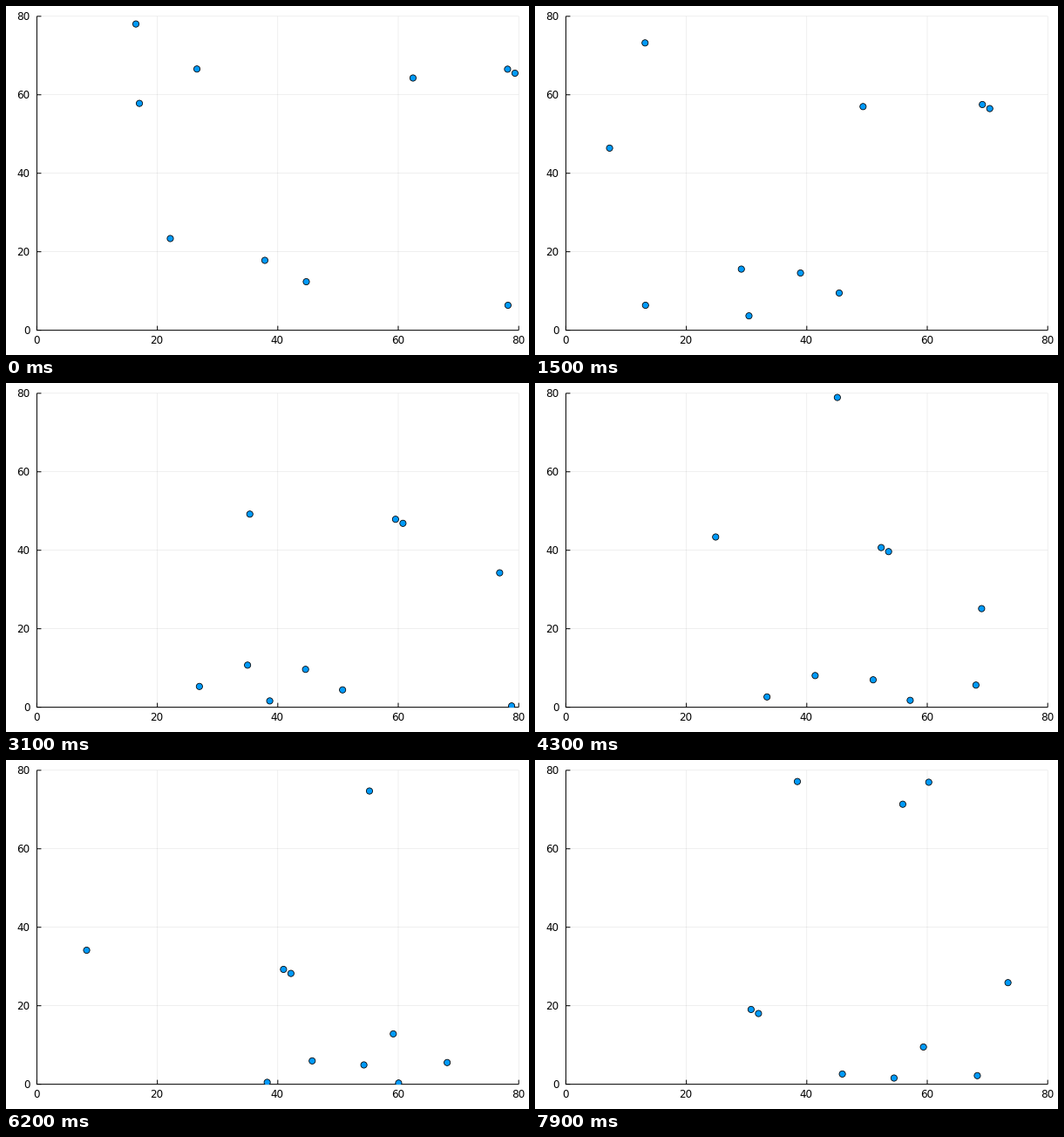
A matplotlib script that plays this animation: 600x400 px, repeating every 8000 ms.

```python
import numpy as np
import matplotlib.pyplot as plt
from matplotlib.animation import FuncAnimation
from matplotlib.patches import Circle, Rectangle

W, H, DPI = 600, 400, 100
LEFT, RIGHT, TOP, BOTTOM = 35.43, 588.19, 11.81, 371.61
PX = 72 / DPI                 # points per pixel
FRAMES = 80
SIZE = 80                     # side of the wrapping world
SIGHT = 10                    # how far a bird sees

# Each bird: x, y, vx, vy. They take their turns in this order.
BIRDS = [
    (44.73, 12.36, -0.198, -0.004),
    (16.44, 78.04, 0.9305, 0.375),
    (78.22, 6.36, 1, 0),
    (22.15, 23.37, 0.707, -0.707),
    (37.85, 17.81, -0.198, -0.004),
    (26.57, 66.57, -0.895, 0.4436),
    (17.02, 57.81, -0.651, -0.760),
    (62.45, 64.28, -0.874, -0.486),
    (78.15, 66.53, -0.6, -0.601),
    (79.38, 65.50, -0.6, -0.601),
]


def simulate():
    """Each bird in turn takes the mean velocity of those in sight, then moves."""
    state = np.array(BIRDS, float)
    pos, vel = state[:, :2], state[:, 2:]
    track = [pos.copy()]
    for _ in range(FRAMES - 1):
        for i in range(len(pos)):
            near = np.hypot(*(pos - pos[i]).T) < SIGHT
            near[i] = False
            if near.any():
                vel[i] = vel[near].mean(axis=0)
            pos[i] = (pos[i] + vel[i]) % SIZE
        track.append(pos.copy())
    return np.array(track)


def to_px(x, y):
    return (LEFT + (RIGHT - LEFT) * x / SIZE,
            BOTTOM + (TOP - BOTTOM) * y / SIZE)


fig = plt.figure(figsize=(W / DPI, H / DPI), dpi=DPI, facecolor="white")
ax = fig.add_axes([0, 0, 1, 1])
ax.set_xlim(0, W)
ax.set_ylim(H, 0)
ax.axis("off")


def line(x0, y0, x1, y1, width=1, alpha=1):
    ax.plot([x0, x1], [y0, y1], color="black", alpha=alpha, lw=width * PX,
            solid_capstyle="butt", snap=False)


font = dict(family="DejaVu Sans", fontsize=12 * PX, color="black",
            va="baseline")
for value in range(0, SIZE + 1, 20):
    x, y = to_px(value, value)
    if value:
        line(x, TOP, x, BOTTOM, 0.5, 0.12)
        line(LEFT, y, RIGHT, y, 0.5, 0.12)
    line(x, BOTTOM, x, BOTTOM - 5)
    line(LEFT, y, LEFT + 5, y)
    ax.text(x - 0.5, 387, str(value), ha="center", **font)
    ax.text(27.5, y + 4.5, str(value), ha="right", **font)
line(LEFT, TOP, LEFT, BOTTOM + 0.5)
line(LEFT, BOTTOM, RIGHT, BOTTOM)

area = Rectangle((LEFT, TOP), RIGHT - LEFT, BOTTOM - TOP,
                 transform=ax.transData)
dots = []
for _ in BIRDS:
    dot = Circle((0, 0), 3.6, fc="#009afa", ec="black", lw=0.8 * PX, zorder=3)
    ax.add_patch(dot)
    dot.set_clip_path(area)
    dots.append(dot)

track = simulate()


def update(step):
    for dot, (x, y) in zip(dots, track[step]):
        dot.center = to_px(x, y)
    return dots


anim = FuncAnimation(fig, update, frames=FRAMES, interval=100, repeat=True,
                     repeat_delay=0)
plt.show()
```
